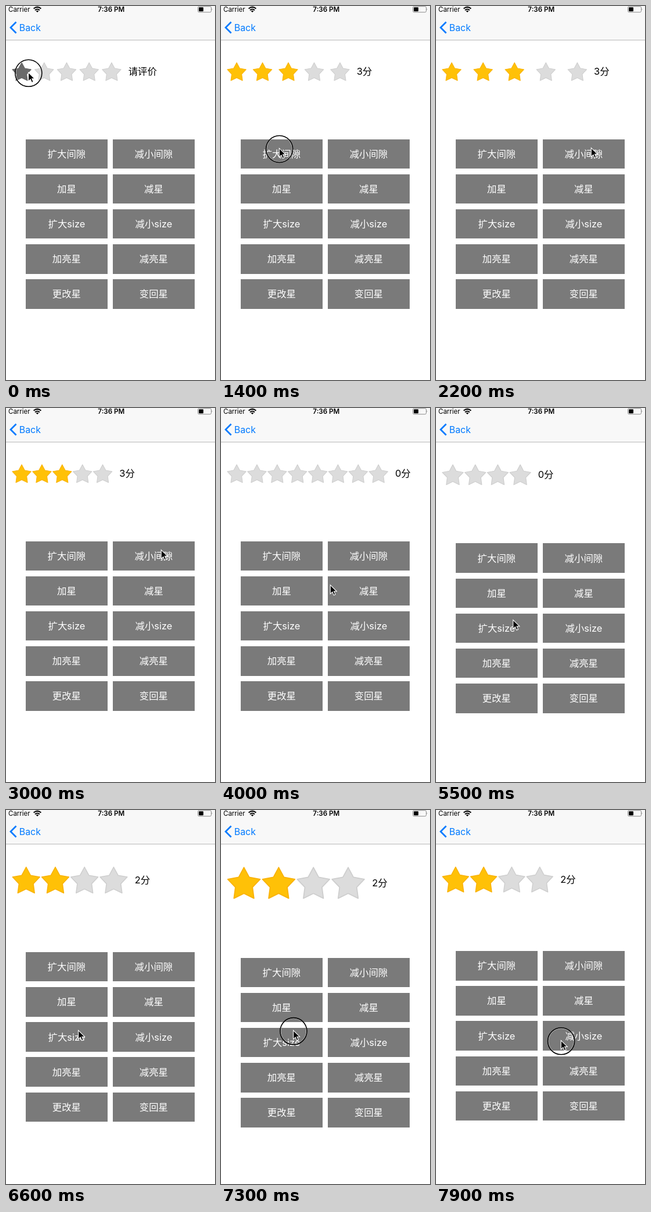
Write an HTML page that moves like this. It is 360 by 642 pixels and loops after 8000 ms.

```html
<!DOCTYPE html>
<html lang="zh-CN">
<head>
<meta charset="utf-8">
<title>Star rating</title>
<style>
  html, body { margin: 0; width: 100%; height: 100%; overflow: hidden; background: #fff; }
  svg { display: block; width: 360px; height: 642px; }
  text { font-family: Inter, "Noto Sans CJK SC", "Noto Sans CJK", sans-serif; font-size: 16.4px; }
</style>
</head>
<body>
<svg viewBox="0 0 360 642">
  <rect width="360" height="642" fill="#fff"/>
  <rect width="360" height="58" fill="#f8f8f8"/>
  <rect y="58" width="360" height="1" fill="#b8b8b8"/>
  <text x="4" y="10" style="font-size:11.5px">Carrier</text>
  <g fill="none" stroke="#000" stroke-width="2">
    <path d="M47.6 4.6Q54 -0.8 60.4 4.6"/>
    <path d="M50 7.2Q54 3.9 58 7.2"/>
  </g>
  <path d="M51.6 8.5Q54 6.8 56.4 8.5L54 11Z"/>
  <text x="181.3" y="10" text-anchor="middle" style="font-size:11.6px;font-weight:600">7:36 PM</text>
  <rect x="330.5" y=".7" width="23" height="10" rx="2.2" fill="none" stroke="#8a8a8a"/>
  <rect x="332" y="2.2" width="8" height="7" rx="1"/>
  <path d="M354.6 4Q356.4 5.7 354.6 7.4Z" fill="#8a8a8a"/>
  <path d="M17.5 27.5L8 37L17.5 46.5" fill="none" stroke="#007aff" stroke-width="2.8"/>
  <text x="22.8" y="42.5" fill="#007aff" style="font-size:15.9px">Back</text>
  <g id="stars"></g>
  <text id="label"></text>
  <g id="buttons"></g>
  <g id="pointer">
    <g id="ring" fill="none">
      <circle cx=".3" cy="1.3" r="22" stroke="#fff" stroke-opacity=".7"/>
      <circle cx=".3" cy="1.3" r="23" stroke="#000" stroke-width="1.6"/>
    </g>
    <path d="M0 0V15.2L3.6 11.9L6 17.4L8.6 16.3L6.3 10.9H11Z" stroke="#fff" stroke-width="1.1"/>
  </g>
</svg>
<script>
const NS = 'http://www.w3.org/2000/svg';
const $ = id => document.getElementById(id);
const set = (el, attrs) => {
  for (const key in attrs) el.setAttribute(key, attrs[key]);
  return el;
};
const add = (parent, tag, attrs) => parent.appendChild(set(document.createElementNS(NS, tag), attrs));

const PT = 0.96, LEFT = 9.6, TOP = 95.2, STAR = 34.88;
const LOOP = 8000, STEP = 100;
const INITIAL = { gap: 4, grow: 0, count: 5, score: -1 };

// The pointer's visits, in steps of 100 ms. While it taps from `from` to `to`,
// gap, grow or count run to the given value; `star` presses that star.
const visits = [
  { from: 0, to: 0, x: 38.5, y: 114, star: 1 },
  { from: 3, to: 3, x: 108, y: 114, star: 3 },
  { from: 13, to: 18, x: 100.3, y: 244.2, gap: 22 },
  { from: 22, to: 29, x: 267.3, y: 243.5, gap: 0 },
  { from: 33, to: 36, x: 105, y: 310, count: 8 },
  { from: 42, to: 49, x: 233.5, y: 300.5, count: 4 },
  { from: 54, to: 56, x: 132.8, y: 363.8, grow: 6 },
  { from: 59, to: 59, x: 70, y: 118, star: 2 },
  { from: 64, to: 67, x: 124.6, y: 378.3, grow: 18 },
  { from: 68, to: 73, x: 124.6, y: 378.3, grow: 26 },
  { from: 76, to: 79, x: 215.3, y: 395.5, grow: 14 }
];

const mix = (a, b, u) => a + (b - a) * u;
const smooth = u => u * u * (3 - 2 * u);
const even = v => Math.round(v / 2) * 2;

function stateAt(step) {
  const state = { ...INITIAL };
  for (const visit of visits.filter(v => v.from <= step)) {
    const u = Math.min(1, (step - visit.from + 1) / (visit.to - visit.from + 1));
    for (const key of ['gap', 'grow', 'count']) {
      if (key in visit) state[key] = mix(state[key], visit[key], u);
    }
    if ('count' in visit) state.score = 0;
    if (visit.star && step > visit.to) state.score = visit.star;
  }
  return state;
}

function pointerAt(step) {
  const i = visits.findLastIndex(v => v.from <= step);
  const here = visits[i], next = visits[i + 1] || here;
  const leave = here.to + 1;
  const u = step > leave ? smooth((step - leave) / (next.from - leave)) : 0;
  return {
    x: mix(here.x, next.x, u),
    y: mix(here.y, next.y, u),
    tapping: step <= here.to && (here.to - step) % 2 === 0,
    pressed: step <= here.to ? here.star : 0
  };
}

const starPoints = Array.from({ length: 10 }, (_, i) => {
  const r = i % 2 ? 0.258 : 0.49, a = Math.PI * i / 5;
  return [0.5 + r * Math.sin(a), 0.546 - r * Math.cos(a)].map(v => v.toFixed(4)).join();
}).join(' ');
const stars = Array.from({ length: 8 }, () => add($('stars'), 'polygon', {
  points: starPoints, 'stroke-width': 0.03, 'stroke-linejoin': 'round'
}));
const looks = {
  off: { fill: '#dcdcdc', stroke: '#cecece' },
  on: { fill: '#ffc107', stroke: '#f9b208' },
  down: { fill: '#6a6a6a', stroke: '#626262' }
};

const buttons = ['扩大间隙', '减小间隙', '加星', '减星', '扩大size', '减小size', '加亮星', '减亮星', '更改星', '变回星']
  .map((name, i) => {
    const x = 34 + i % 2 * 150;
    const box = add($('buttons'), 'rect', { x, width: 141, fill: '#7a7a7a' });
    const text = add($('buttons'), 'text', { x: x + 70.4, fill: '#fff', 'text-anchor': 'middle' });
    text.textContent = name;
    return { box, text, y: 228.65 + Math.floor(i / 2) * 60.15 };
  });

function render(step) {
  const state = stateAt(step), pointer = pointerAt(step);
  const gap = even(state.gap) * PT, grow = even(state.grow) * PT;
  const count = Math.round(state.count), size = STAR + grow;

  stars.forEach((star, i) => {
    const look = pointer.pressed === i + 1 ? 'down' : i < state.score ? 'on' : 'off';
    set(star, {
      ...looks[look],
      visibility: i < count ? 'visible' : 'hidden',
      transform: `translate(${LEFT + i * (size + gap)} ${TOP}) scale(${size})`
    });
  });

  set($('label'), { x: LEFT + count * size + (count - 1) * gap + 11.3, y: TOP + size / 2 + 5.7 });
  $('label').textContent = state.score < 0 ? '请评价' : state.score + '分';

  // Button edges sit on whole pixels.
  for (const { box, text, y } of buttons) {
    const top = Math.round(y + grow), bottom = Math.round(y + grow + 50.45);
    set(box, { y: top, height: bottom - top });
    set(text, { y: y + grow + 31.2 });
  }

  set($('pointer'), { transform: `translate(${pointer.x} ${pointer.y})` });
  set($('ring'), { visibility: pointer.tapping ? 'visible' : 'hidden' });
}

const start = performance.now();
function tick() {
  render(Math.floor((performance.now() - start) % LOOP / STEP));
  requestAnimationFrame(tick);
}
tick();
</script>
</body>
</html>
```
